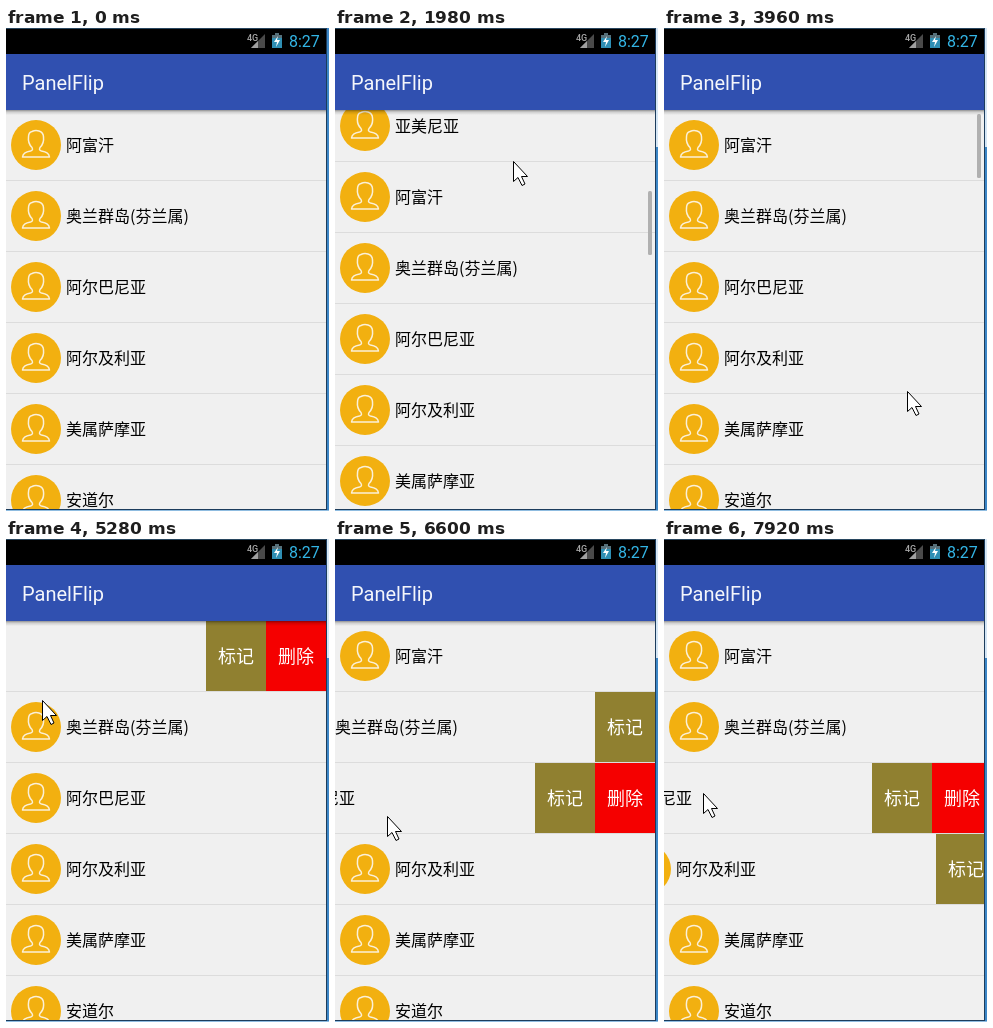
An HTML page for the animation above (8000 ms loop, 323 by 483 pixels).

```html
<!DOCTYPE html>
<html lang="zh-CN">
<head>
<meta charset="utf-8">
<title>PanelFlip</title>
<style>
  html, body { margin: 0; width: 100%; height: 100%; overflow: hidden; background: #f0f0f0; }
  svg { display: block; width: 100vw; height: 100vh; }
  text { font-family: "Noto Sans CJK SC", "Noto Sans CJK", sans-serif; }
  .latin { font-family: Roboto, sans-serif; }
  .name { font-size: 16px; fill: #000; }
  .label { font-size: 18px; fill: #fff; text-anchor: middle; }
</style>
</head>
<body>
<svg viewBox="0 0 323 483">
  <defs>
    <clipPath id="view"><rect y="82" width="320" height="399"/></clipPath>
    <linearGradient id="shade" x2="0" y2="1">
      <stop stop-color="#000" stop-opacity=".4"/>
      <stop offset=".4" stop-color="#000" stop-opacity=".14"/>
      <stop offset="1" stop-color="#000" stop-opacity="0"/>
    </linearGradient>
    <g id="avatar">
      <circle cx="30" cy="35" r="25" fill="#f2b010"/>
      <path d="M26 21.500C24 22 22.500 24 22.500 27C22 31 23.500 35 26 37.500C27 39.500 26.500 40.500 24.500 41C20 42 17 43 16.500 47H43.500C43 43 40 42 35.500 41C33.500 40.500 33 39.500 34 37.500C36.500 35 38 31 37.500 27C37.500 24 36 22 33 21C30 20 28 20.500 26 21.500z"
        fill="none" stroke="#fbf0d8" stroke-width="1.5" stroke-linejoin="round"/>
    </g>
    <g id="menu">
      <rect width="60" height="70" fill="#908030"/>
      <rect x="60" width="60" height="70" fill="#f50000"/>
      <text class="label" x="30" y="42">标记</text>
      <text class="label" x="90" y="42">删除</text>
    </g>
  </defs>

  <rect width="323" height="483" fill="#f0f0f0"/>
  <g id="list" clip-path="url(#view)"></g>
  <rect id="thumb" x="313" width="4" height="64" rx="1.5" fill="#b0b0b0"/>

  <rect y="82" width="320" height="5" fill="url(#shade)"/>
  <rect width="320" height="26" fill="#000"/>
  <rect y="26" width="320" height="56" fill="#3050b0"/>
  <rect width="323" height="1" fill="#28465f"/>
  <text class="latin" x="16" y="62" font-size="20" fill="#f4f6fb">PanelFlip</text>

  <text class="latin" x="241" y="13" font-size="9" font-weight="500" fill="#a8a8a8">4G</text>
  <path d="M259 6V20H245z" fill="#4a4a4a"/>
  <path d="M252 13V20H245z" fill="#a0a0a0"/>
  <path d="M269 5h4v2h3v13h-10V7h3z" fill="#56707a"/>
  <path d="M266 10h10v10h-10z" fill="#2f8fb4"/>
  <path d="M272 8l-4 6h3l-1 5 4-7h-3z" fill="#fff"/>
  <text class="latin" x="283" y="19" font-size="16" fill="#33b5e5">8:27</text>

  <rect x="320" width="1" height="483" fill="#1c3c5c"/>
  <rect x="321" width="2" height="483" fill="#3c86c6"/>
  <rect id="edgeTop" x="321" width="2" height="119" fill="#d5e6f5"/>
  <rect y="481" width="321" height="1" fill="#1c3c5c"/>
  <rect y="482" width="323" height="1" fill="#8fbce0"/>

  <path id="cursor" d="M.5 .5V20.500L5 16.500 9 24.500 12 23 8.500 15.500H14.500z" fill="#fff" stroke="#000"/>
</svg>
<script>
const LOOP = 8000, STEP = 330, PITCH = 71, TOP = 82, WIDTH = 320;
const names = ['阿富汗', '奥兰群岛(芬兰属)', '阿尔巴尼亚', '阿尔及利亚',
  '美属萨摩亚', '安道尔', '奥兰群岛(芬兰属)', '亚美尼亚'];

// Pointer position per step, null while it is outside the window
const pointer = [null, [20, 261], [94, 205], [118, 248], [172, 427], [175, 290],
  [178, 133], [182, 310], null, [171, 305], [218, 141], [228, 110], [243, 363],
  [101, 200], [259, 139], [4, 139], [36, 161], [285, 192], [60, 225], [284, 274],
  [52, 277], [282, 346], [32, 343], [280, 252], [39, 254]];

// Each track: first step, then one value per step; 0 elsewhere
const scroll = { from: 5, values: [190, 516, 300, 72, 68, 68, 68] };
const thumbAlpha = { from: 5, values: [1, 1, 1, 1, 1, .5, 0, 1] };
const swipes = [
  { from: 15, values: [110, 120, 120, 12] },
  { from: 18, values: [120, 120, 60] },
  { from: 20, values: [120, 120, 50, 0, 112] },
  { from: 22, values: [120, 120, 48] }
];

const $ = id => document.getElementById(id);
const valueAt = (track, step) => track ? track.values[step - track.from] || 0 : 0;
const move = (el, x, y) => el.setAttribute('transform', `translate(${x} ${y})`);
const show = (el, on) => el.setAttribute('visibility', on ? 'visible' : 'hidden');

const rows = Array.from({ length: 14 }, (_, i) => {
  const row = document.createElementNS('http://www.w3.org/2000/svg', 'g');
  row.innerHTML = `<g><use href="#avatar"/><text class="name" x="60" y="41">${names[i % names.length]}</text></g>
    <use href="#menu"/><rect y="70" width="${WIDTH}" height="1" fill="#dcdcdc"/>`;
  $('list').append(row);
  return { row, content: row.children[0], menu: row.children[1] };
});

function draw(ms) {
  const step = Math.floor(ms / STEP);
  const offset = valueAt(scroll, step);
  rows.forEach(({ row, content, menu }, i) => {
    const shift = valueAt(swipes[i], step);
    move(row, 0, TOP + PITCH * i - offset);
    move(content, -shift, 0);
    move(menu, WIDTH - shift, 0);
  });

  $('thumb').setAttribute('y', Math.round(86 + offset * .15));
  $('thumb').setAttribute('opacity', valueAt(thumbAlpha, step));
  show($('edgeTop'), step >= scroll.from);

  const at = pointer[step];
  show($('cursor'), at);
  if (at) move($('cursor'), ...at);
}

const start = performance.now();
function tick() {
  draw((performance.now() - start) % LOOP);
  requestAnimationFrame(tick);
}
tick();
</script>
</body>
</html>
```
